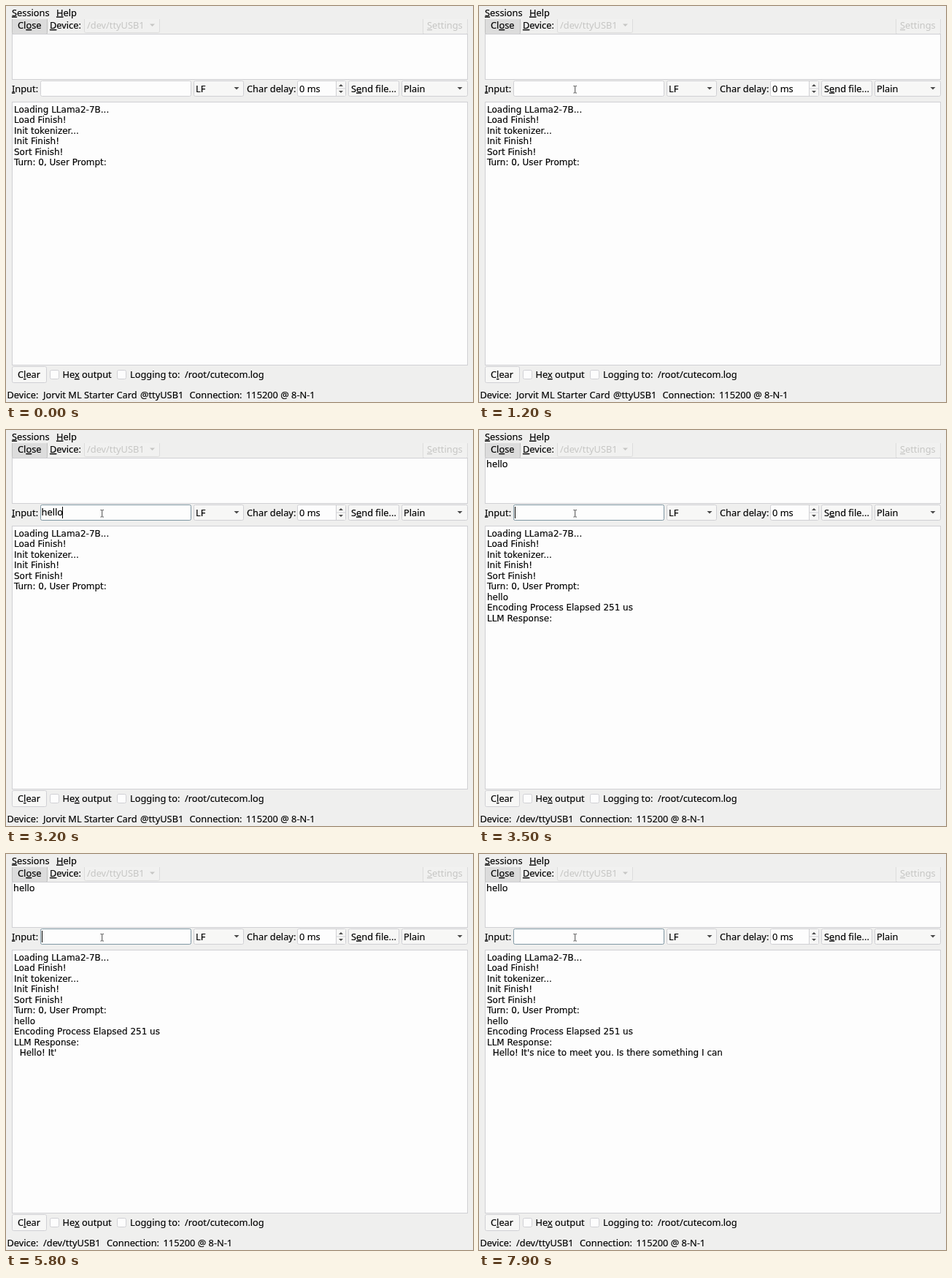
These frames come from a looping animation (640x542 px, 8 s). An HTML page:

```html
<!DOCTYPE html>
<html lang="en">
<head>
<meta charset="utf-8">
<title>Serial terminal</title>
<style>
  html, body { margin: 0; width: 100%; height: 100%; overflow: hidden; background: #efefee; }
  svg { display: block; width: 100%; height: 100%; }
  text { font: 12.8px "Noto Sans", sans-serif; fill: #000; stroke: #000; stroke-width: .15px; white-space: pre; }
  .log { font: 12px "DejaVu Sans", sans-serif; }
  .off { fill: #c6c6c4; stroke: none; }
  .key { text-decoration: underline; }
</style>
</head>
<body>
<svg id="stage" viewBox="0 0 640 542" preserveAspectRatio="none"></svg>
<script>
const LOOP = 8000;
const BACK = '#efefee', PAPER = '#fdfdfd', EDGE = '#d0d0d4', BUTTON = '#f7f7f6',
  FAINT = '#f1f1f0', FAINT_EDGE = '#dcdcdc', DARK = '#4a4a4a';
const stage = document.getElementById('stage');

// "_" marks the underlined shortcut letter that follows it.
const label = (x, y, s, cls = '') =>
  `<text x="${x}" y="${y}" class="${cls}">${s.replace(/_(.)/, '<tspan class="key">$1</tspan>')}</text>`;
const box = (x, y, w, h, fill, stroke = EDGE, r = 2) =>
  `<rect x="${x + .5}" y="${y + .5}" width="${w - 1}" height="${h - 1}" rx="${r}" fill="${fill}" stroke="${stroke}"/>`;
const arrow = (x, y, dir = 1, color = DARK, r = 3.5) =>
  `<path d="M${x - r} ${y}h${2 * r}l${-r} ${r * dir}z" fill="${color}"/>`;
const slot = (id, x, y, cls = '') => `<text id="${id}" x="${x}" y="${y}" class="${cls}"/>`;

const ROW = 117.5, FOOT = 509, STATUS = 536.8;
const logY = i => 146 + 14.45 * i;
const boot = ['Loading LLama2-7B...', 'Load Finish!', 'Init tokenizer...', 'Init Finish!',
  'Sort Finish!', 'Turn: 0, User Prompt:'];
const SEND = 3400, ANSWER = 3500;
const reply = [
  { at: SEND, s: 'hello' },
  { at: ANSWER, s: 'Encoding Process Elapsed 251 us' },
  { at: ANSWER, s: 'LLM Response:' }
];
const tokens = ['  Hello', '!', ' It', "'", 's', ' nice', ' to', ' meet', ' you', '.',
  ' Is', ' there', ' something', ' I', ' can'];

stage.innerHTML = `
  <rect width="640" height="542" fill="${BACK}"/>
  ${box(8, 14, 49, 25, '#dcdcdc', '#c0c0c0')}
  ${box(107, 14, 104, 23, FAINT, FAINT_EDGE)}
  ${box(571, 14, 62, 25, FAINT, FAINT_EDGE)}
  <rect width="640" height="18" fill="${BACK}"/>
  ${label(8, 13.5, '_Sessions')}${label(69, 13.5, '_Help')}
  ${label(16, 31, 'Cl_ose')}${label(60, 31, '_Device:')}
  ${label(111, 31, '/dev/ttyUSB1', 'off')}${arrow(200.5, 24.5, 1, '#c6c6c4')}
  ${label(577, 31, '_Settings', 'off')}
  ${box(8, 38, 625, 63, PAPER, EDGE, 0)}
  ${label(8, ROW, '_Input:')}
  ${box(47, 102, 207, 22, PAPER)}
  <g id="focus">${box(47, 102, 207, 22, PAPER, '#8098a4')}</g>
  ${box(257, 102, 69, 22, BUTTON)}${label(260, ROW, 'LF')}${arrow(316, 111)}
  ${label(330, ROW, 'Char delay:')}
  ${box(399, 102, 67, 22, PAPER)}
  <path d="M453 103h12v20h-12z" fill="${BUTTON}"/><path d="M452.5 103v20M453 113h12" stroke="${EDGE}"/>
  ${label(402, ROW, '0 ms')}${arrow(459, 110, -1, DARK, 3)}${arrow(459, 116, 1, DARK, 3)}
  ${box(469, 102, 70, 22, BUTTON)}${label(473, ROW, 'S_end file...')}
  ${box(542, 102, 91, 22, BUTTON)}${label(545, ROW, 'Plain')}${arrow(622, 111)}
  ${box(8, 131, 625, 361, PAPER, EDGE, 0)}
  ${boot.map((s, i) => label(11, logY(i), s, 'log')).join('')}
  ${reply.map((r, i) => slot('line' + i, 11, logY(boot.length + i), 'log')).join('')}
  ${slot('answer', 11, logY(boot.length + reply.length), 'log')}
  ${box(8, 493, 48, 23, BUTTON)}${label(16, FOOT, 'C_lear')}
  ${box(60, 498, 13, 13, PAPER)}${label(77.5, FOOT, 'He_x output')}
  ${box(152, 498, 13, 13, PAPER)}${label(170, FOOT, 'Logging to:')}
  ${label(245, FOOT, '/root/cutecom.log')}
  ${label(1.5, STATUS, 'Device:')}
  <g id="before">${label(51, STATUS, 'Jorvit ML Starter Card')}${label(184, STATUS, '@ttyUSB1')}</g>
  <g id="after">${label(51, STATUS, '/dev/ttyUSB1')}</g>
  <g id="link">${label(251.5, STATUS, 'Connection:')}${label(329, STATUS, '115200 @ 8-N-1')}</g>
  ${slot('typed', 48.5, 117)}${slot('history', 10, 51)}
  <path id="caret" d="M0 105v16" stroke="#000"/>
  <path id="pointer" d="M0 0v9l2.2-1.8 1.6 3.4 1.6-.8-1.6-3.2h2.8z" fill="#222" stroke="#fdfdfd" stroke-width=".6"/>
  <path id="beam" d="M129.5 109.5h1.5l.7.6.7-.6h1.5M131.7 110v8.5M129.5 119h1.5l.7-.6.7.6h1.5" fill="none" stroke="${DARK}"/>`;

const el = {};
stage.querySelectorAll('[id]').forEach(n => el[n.id] = n);
const show = (n, on) => n.style.display = on ? '' : 'none';
const write = (n, s) => { if (n.textContent !== s) n.textContent = s; };

const CLICK = 1300, TYPE = 2200, KEY = 130, BLINK = 600;

// The caret restarts its blink at each click, key press and send.
function caretOn(t) {
  if (t < CLICK) return false;
  if (t >= TYPE && t < SEND) return true;
  const since = t - (t < TYPE ? CLICK : SEND);
  return Math.floor(since / BLINK) % 2 === 0;
}

function draw(t) {
  const sent = t >= SEND;

  // The pointer drops in from the top and turns into a beam over the input.
  const k = (t - 700) / 300, y = 62 + 52 * k;
  const over = y >= 102;
  show(el.pointer, y > -10 && !over);
  el.pointer.setAttribute('transform', `translate(${117 + 14 * k} ${y})`);
  show(el.beam, over);
  show(el.focus, t >= CLICK);

  const count = t < TYPE || sent ? 0 : Math.min(5, Math.floor((t - TYPE) / KEY) + 1);
  write(el.typed, 'hello'.slice(0, count));
  write(el.history, sent ? 'hello' : '');
  show(el.caret, caretOn(t));
  const x = count ? 49 + el.typed.getComputedTextLength() : 49.5;
  el.caret.setAttribute('transform', `translate(${Math.round(x) - .5} 0)`);

  reply.forEach((r, i) => write(el['line' + i], t >= r.at ? r.s : ''));
  const n = Math.max(0, Math.floor((t - 5200) / 180) + 1);
  write(el.answer, tokens.slice(0, n).join(''));

  show(el.before, !sent);
  show(el.after, sent);
  el.link.setAttribute('transform', `translate(${sent ? -113.5 : 0} 0)`);
}

const start = performance.now();
function tick() {
  draw((performance.now() - start) % LOOP);
  requestAnimationFrame(tick);
}
tick();
</script>
</body>
</html>
```
